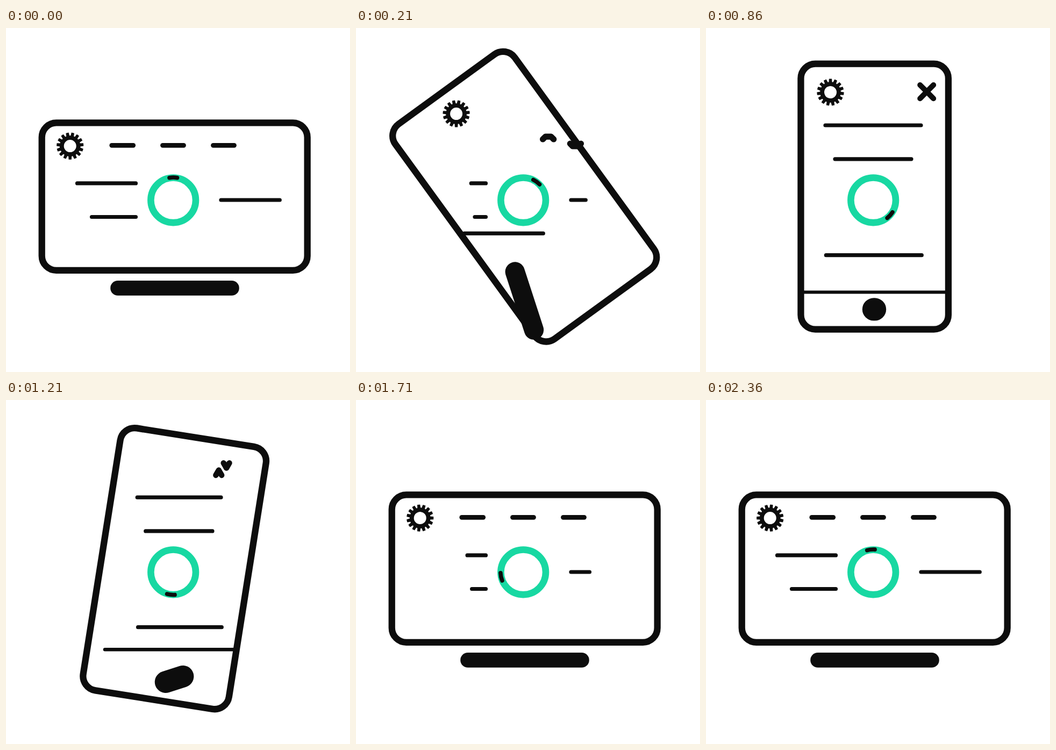
Animation, 640 px wide and 640 px high, one loop 2.43 s. Source, as an HTML page:

```html
<!DOCTYPE html>
<html lang="en">
<head>
<meta charset="utf-8">
<title>Rotating screen</title>
<style>
  html, body { margin: 0; width: 100%; height: 100%; overflow: hidden; background: #fff; }
  svg { display: block; width: 100vw; height: 100vh; }
  .ink { fill: none; stroke: #0d0d0d; stroke-linecap: round; stroke-linejoin: round; }
  .text { stroke-width: 7.2; }
  #gear { fill: #0d0d0d; fill-rule: evenodd; }
  #ring { fill: #fff; fill-opacity: .5; stroke: #18d8a2; stroke-width: 12.6; }
</style>
</head>
<body>
<svg viewBox="0 0 640 640">
  <rect id="frame" class="ink" x="66.7" y="176.4" width="494" height="274.5" rx="27" stroke-width="12.3"/>
  <path id="gear"/>
  <path id="bar" class="ink"/>
  <path id="down" class="ink"/>
  <path id="up" class="ink"/>
  <g id="lines"></g>
  <path id="stand" class="ink"/>
  <circle id="ring" cx="311.2" cy="320.3" r="41.8"/>
  <path id="spin" class="ink" stroke-width="7.6" d="M304 278.7A42.2 42.2 0 0 1 318.5 278.7"/>
</svg>
<script>
const LOOP = 2430, OUT_FPS = 14, FPS = 25;
const $ = id => document.getElementById(id);
const clamp = (v, a = 0, b = 1) => Math.min(b, Math.max(a, v));
const lerp = (a, b, p) => a + (b - a) * p;
const smooth = p => p * p * (3 - 2 * p);
const bulge = p => p + .55 * p * (1 - p);

function gearPath() {
  const teeth = 15, step = 360 / teeth;
  const at = (r, deg) => {
    const a = deg * Math.PI / 180;
    return `${(r * Math.sin(a)).toFixed(2)} ${(-r * Math.cos(a)).toFixed(2)}`;
  };
  const pts = [];
  for (let i = 0; i < teeth; i++) {
    const c = step * (i + .5);
    pts.push(at(19.3, c - 9), at(25.2, c - 6), at(25.2, c + 6), at(19.3, c + 9));
  }
  return `M${pts.join('L')}ZM-11.5 0a11.5 11.5 0 1 0 23 0a11.5 11.5 0 1 0 -23 0Z`;
}
$('gear').setAttribute('d', gearPath());

const lines = Array.from({ length: 6 }, () => {
  const p = document.createElementNS('http://www.w3.org/2000/svg', 'path');
  p.setAttribute('class', 'ink text');
  return $('lines').appendChild(p);
});

function span(el, x1, x2, y, width) {
  el.style.display = '';
  el.setAttribute('d', `M${x1} ${y}H${x2}`);
  if (width) el.setAttribute('stroke-width', width);
}

// One half of the cross; flattens into a dash as u goes from 0 to 1
function chevron(el, u, x, y, dir) {
  const w = u ? 5 + 14.5 * smooth(u) : 12.5;
  const depth = u ? 11 * (1 - u) ** 1.6 : 12.6;
  const flat = u ? Math.max(0, w - depth) : 0;
  const m = y + dir * depth;
  el.setAttribute('d', `M${x - w} ${y}L${x - flat} ${m}L${x + flat} ${m}L${x + w} ${y}`);
  el.setAttribute('stroke-width', 10 - 1.2 * u + 7 * u * (1 - u));
}

// Part of a text line between the fractions a and b
function trim(el, x, length, y, a, b) {
  span(el, x + length * a, x + length * b, y);
  if (b <= a) el.style.display = 'none';
}

function drawLines(s) {
  const wide = s < 40 ? clamp(1 - s / 8) : clamp((s - 40) / 9.5);
  const grow = clamp((s - 10) / 9), cut = clamp((s - 30) / 8);
  const slide = 18.5 * grow + 16 * cut;

  trim(lines[0], 241.5, -109, 288.9, 0, wide);
  trim(lines[1], 241.5, -82, 351.5, 0, wide);
  trim(lines[2], 400, 109.3, 320, 0, wide);
  trim(lines[3], 222, 178, 181 + cut, cut, grow);
  trim(lines[4], 221.5 + slide, 142, 243.8 + cut, cut, grow);
  trim(lines[5], 223.3, 178, 422.7, cut, grow);
}

function draw(s) {
  const turn = clamp(s, 0, 10) + clamp(s - 30, 0, 10);
  const u = Math.abs(10 - turn) / 10; // 1 = landscape, 0 = portrait

  $('frame').setAttribute('transform', `rotate(${9 * turn} 313.7 313.65)`);
  $('spin').setAttribute('transform', `rotate(${6 * s} 311.2 320.3)`);

  const roll = clamp(s - 12, 0, 15) + clamp(s - 42, 0, 15) - (s > 30 ? 15 : 0);
  $('gear').style.display = s > 30 && s < 40 ? 'none' : '';
  $('gear').setAttribute('transform',
    `translate(${lerp(231.5, 119.2, u)} ${lerp(119.5, 219.6, u)}) rotate(${6 * roll})`);

  const mid = lerp(313.75, 216.75, u), half = Math.abs(135.6 - 155.6 * u);
  span($('bar'), mid - half, mid + half, lerp(491.5, 218.3, u), 6.2 + 2.5 * u);

  // Dashes hang back on the way up and drop evenly on the way down
  const drop = hold => turn < 10 ? 1 - (1 - u) ** hold : u;
  chevron($('down'), u, lerp(410.7, 405, u), lerp(106, 218.3, drop(7)), 1);
  chevron($('up'), u, lerp(410.7, 311, bulge(u)), lerp(131.2, 218.3, drop(4)), -1);

  const reach = (2.2 + 209.5 * bulge(u)) / 2;
  span($('stand'), -reach, reach, 0, 42.2 - 14.3 * u);
  $('stand').setAttribute('transform',
    `translate(${313 + u} ${523.4 - 39.5 * u}) rotate(${-18 * turn})`);

  drawLines(s);
}

// The picture advances in steps of 1/14 s
function tick() {
  const t = Math.floor(performance.now() % LOOP / 10) * 10;
  const step = Math.floor((t + 5) * OUT_FPS / 1000);
  draw(Math.ceil(step * FPS / OUT_FPS));
  requestAnimationFrame(tick);
}
tick();
</script>
</body>
</html>
```
